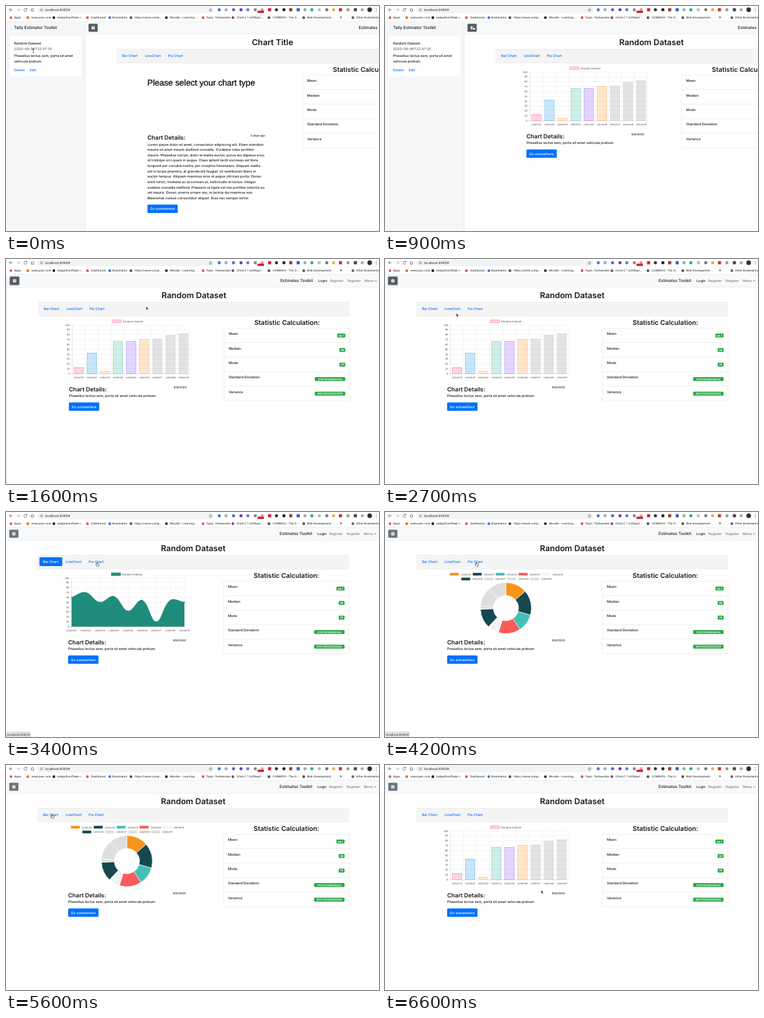
Write an HTML page that moves like this. It is 600 px wide and 362 px high and loops after 6.7 s.

```html
<!DOCTYPE html>
<html lang="en">
<head>
<meta charset="utf-8">
<title>Random Dataset</title>
<style>
html, body { margin: 0; width: 100%; height: 100%; overflow: hidden; background: #fff; }
svg { display: block; width: 100vw; height: 100vh; }
text {
  font-family: Inter, "Open Sans", sans-serif; font-size: 5.52px; font-weight: 450;
  fill: #16191c; white-space: pre; text-rendering: geometricPrecision;
}
.heading { font-weight: 600; }
.chart text { font-family: "Liberation Sans", Arial, sans-serif; font-size: 4.35px; font-weight: 400; fill: #555; }
</style>
</head>
<body>
<svg id="stage" viewBox="0 0 600 362" preserveAspectRatio="none" xmlns="http://www.w3.org/2000/svg"></svg>
<script>
const LOOP = 6700;
const SIDEBAR = 127.5;
const BLUE = '#0071fb';
const times = { load: 400, slide: 1300, line: 3050, pie: 3700, bars: 5700 };

const text = (x, y, s, attrs = '') => `<text x="${x}" y="${y}" ${attrs}>${s}</text>`;
const sized = (x, y, s, size, attrs = '', css = '') =>
  text(x, y, s, `style="font-size:${size}px;${css}" ${attrs}`);
const heading = (x, y, s, size, attrs = '') => sized(x, y, s, size, `class="heading" ${attrs}`);
const rect = (x, y, w, h, fill, attrs = '') =>
  `<rect x="${x}" y="${y}" width="${w}" height="${h}" fill="${fill}" ${attrs}/>`;
const circle = (x, y, r, fill, attrs = '') => `<circle cx="${x}" cy="${y}" r="${r}" fill="${fill}" ${attrs}/>`;
const path = (d, attrs) => `<path d="${d}" ${attrs}/>`;
const link = (x, y, s) => sized(x, y, s, 5.52, '', `fill:${BLUE}`);
const range = n => [...Array(n).keys()];
const clamp = v => Math.max(0, Math.min(1, v));
const easeOut = (p, power = 4) => 1 - (1 - clamp(p)) ** power;

// Browser window

function browserChrome() {
  const stroke = 'fill="none" stroke="#555" stroke-width=".8"';
  const dots = [
    [343, '#3f7de0'], [354, '#aaa'], [366, '#4b6fd0'], [378, '#6a3fb5'], [389, '#5b7fe0'],
    [401, '#888'], [412, '#c9a3a3'], [435, '#333'], [447, '#222'], [481, '#9aa'],
    [492, '#19b37b'], [504, '#bbb'], [516, '#777'], [527, '#e0b64a'], [550, '#999'], [573, '#aaa']
  ].map(([x, c]) => circle(x, 6, 2.5, c)).join('');
  const squares = [[424, '#d3202e'], [458, '#9c3b2e'], [470, '#2463c9'], [538, '#c8321f'], [562, '#444']]
    .map(([x, c]) => rect(x - 2.5, 3.5, 5, 5, c)).join('');
  const bookmarks = [
    [8, 13, 'Apps', '#d96a4a'], [35, 41, 'www.pwc.com', '#d9772b'],
    [77, 82, 'realpython/flask-r...', '#222'], [131, 137, 'Dashboard', '#e2574c'],
    [167, 171, 'Bookmarks', '#3f7de0'], [201, 207, 'https://www.comp...', '#555'],
    [258, 264, 'Moodle - Learning...', '#333'], [317, 322, 'Topic: Testwarden', '#e2574c'],
    [365, 371, 'Chirm | * is219spri...', '#8a4a7d'], [423, 429, 'COM9014 - The O...', '#555'],
    [479, 484, 'Web Development...', '#555'], [558, 563, 'Other Bookmarks', '#666']
  ].map(([ix, x, s, c]) => circle(ix, 18.7, 2.2, c) + sized(x, 20.3, s, 4.45, '', 'fill:#2c2f32')).join('');
  return rect(0, 0, 600, 25, '#fff') +
    path('M10.5 6H5.5M8 3.6L5.6 6L8 8.4', stroke) +
    path('M17.5 6H22.5M20 3.6L22.4 6L20 8.4', 'fill="none" stroke="#aaa" stroke-width=".8"') +
    path('M33.2 4.6A2.4 2.4 0 1 0 33.6 6.6M33.6 3.2V5H31.8', stroke) +
    path('M40 6L42.5 3.6L45 6M40.8 5.5V8.3H44.2V5.5', stroke) +
    rect(50, 1, 285, 10.5, '#f1f3f4', 'rx="5.2"') +
    circle(57, 6.2, 1.9, 'none', 'stroke="#666" stroke-width=".6"') + rect(56.7, 5.5, .6, 1.8, '#666') +
    sized(63, 8, 'localhost:8081/#', 5, '', 'fill:#333') +
    path('M329 3.7L329.7 5.5L331.6 5.6L330.1 6.8L330.6 8.6L329 7.6L327.4 8.6L327.9 6.8L326.4 5.6L328.3 5.5Z',
      'fill="none" stroke="#555" stroke-width=".5"') +
    dots + squares + rect(404.5, 7.4, 10.5, 3.8, '#d9202a', 'rx=".8"') +
    circle(585, 6, 3.7, '#3b2a2c') +
    [3.8, 6, 8.2].map(y => circle(595.5, y, .6, '#555')).join('') +
    bookmarks + sized(537, 20.4, '»', 6) + rect(0, 24.6, 600, .5, '#dcdee0');
}

// Page content, laid out with the sidebar left of x = 0

function sidebar() {
  return rect(-SIDEBAR, 25, SIDEBAR, 337, '#f4f6f8') + rect(-.7, 25, .7, 337, '#dee2e6') +
    `<g transform="translate(${-SIDEBAR})">` +
    sized(13, 37.3, 'Tally Estimator Toolkit', 6.6) +
    rect(6, 48, 115, 65.5, '#fff', 'rx="1"') +
    text(13, 61.6, 'Random Dataset') +
    sized(13, 71.2, '2020-08-06T22:47:35', 5.6, '', 'fill:#5c646c') +
    text(13, 82, 'Phasellus lectus sem, porta sit amet') + text(13, 90.6, 'vehicula pretium') +
    link(13, 105, 'Delete') + link(38.3, 105, 'Edit') + '</g>';
}

function navbar() {
  return rect(0, 25, 600, 20, '#f8f9fa') + rect(0, 45, 600, .5, '#dee2e6') +
    rect(4, 27.4, 17.2, 15.4, '#b5babf', 'rx="2.4" id="ring"') +
    rect(5.2, 28.6, 14.8, 13, '#6c757d', 'rx="1.5" id="toggle"') +
    rect(10.2, 32.8, 5, 4.6, '#fff', 'rx=".6"') +
    path('M11.2 35.1H14M12.9 34L14 35.1L12.9 36.2', 'fill="none" stroke="#555" stroke-width=".6"') +
    sized(440, 37.3, 'Estimates Toolkit', 6.5) + text(501, 37.1, 'Login') +
    [[520, 'Register'], [548, 'Register'], [575.5, 'Menu']]
      .map(([x, s]) => sized(x, 37.1, s, 5.52, '', 'fill:#7c7e80')).join('') +
    path('M592 34.4H595.6L593.8 36.3Z', 'fill="#7c7e80"');
}

function statistics() {
  const rows = [['Mean:', '58.7', 13], ['Median:', '68', 9.5], ['Mode', '66', 9.5],
    ['Standard Deviation', '27.871311418145144', 49], ['Variance', '663.1222222222223', 49]];
  return heading(398.3, 105.5, 'Statistic Calculation:', 10.6) +
    rect(349.7, 111.2, 202, 116.8, '#fff', 'stroke="#dcdcdc" stroke-width=".5" rx="1.2"') +
    rows.map(([label, value, w], i) => {
      const y = 111.2 + i * 23.36;
      return (i ? rect(349.7, y - .2, 202, .45, '#dcdcdc') : '') + text(357, y + 11.1, label) +
        rect(544.6 - w, y + 8.8, w, 6.2, '#28a745', 'rx="1.3"') +
        sized(544.6 - w / 2, y + 13.4, value, 4, 'text-anchor="middle"', 'fill:#fff;font-weight:700');
    }).join('');
}

const LOREM = `Lorem ipsum dolor sit amet, consectetur adipiscing elit. Etiam interdum
mauris sit amet mauris eleifend convallis. Curabitur vitae porttitor
mauris. Phasellus rutrum, dolor at mattis auctor, purus leo dapibus eros,
id tristique orci quam in augue. Class aptent taciti sociosqu ad litora
torquent per conubia nostra, per inceptos himenaeos. Aliquam mattis
est in turpis pharetra, at gravida elit feugiat. Ut vestibulum libero in
auctor tempus. Aliquam maximus eros ut augue ultricies porta. Donec
enim tortor, molestie ac accumsan ut, sollicitudin et lectus. Integer
sodales convallis eleifend. Praesent ut ligula vel nisi porttitor lobortis eu
vel mauris. Donec viverra ornare nisi, in lacinia dui maximus non.
Maecenas cursus consectetur aliquet. Duis nec semper tortor.`.split('\n');

function details(title, lines, date, shift) {
  const buttonY = 222.2 + shift + lines.length * 8.63;
  return heading(301.2, 62.8, title, 13.1, 'text-anchor="middle"') +
    heading(100, 212.7 + shift, 'Chart Details:', 9.3) +
    sized(289.5, 207.8 + shift, date, 4.6, 'text-anchor="end"') +
    lines.map((s, i) => text(100, 222.3 + shift + i * 8.63, s)).join('') +
    rect(100, buttonY, 48.8, 13.5, BLUE, 'rx="1.5"') +
    sized(124.4, buttonY + 8.7, 'Go somewhere', 5.52, 'text-anchor="middle"', 'fill:#fff');
}

// Charts

const TOP = 106, BOTTOM = 184.5, LEFT = 105.5;
const yOf = v => BOTTOM - v / 100 * (BOTTOM - TOP);

function axes(right, columns, centered) {
  const step = (right - LEFT) / columns;
  return range(11).map(i => rect(LEFT - 3, yOf(i * 10) - .2, right - LEFT + 3, .4, i ? '#e3e3e3' : '#bbb') +
      text(LEFT - 4, yOf(i * 10) + 1.5, i * 10, 'text-anchor="end"')).join('') +
    range(columns + 1).map(i => rect(LEFT + i * step - .2, TOP, .4, BOTTOM - TOP + 3, i ? '#e3e3e3' : '#bbb')).join('') +
    range(9).map(i => text(LEFT + (i + (centered ? .5 : 0)) * step, 192.2, 'column' + (i + 1), 'text-anchor="middle"')).join('');
}

const legend = (fill, stroke) =>
  rect(169.5, 97.9, 14.8, 4.4, fill, `stroke="${stroke}" stroke-width=".6"`) + text(186.7, 101.7, 'Random Dataset');

function barChart(grow) {
  const values = [13, 42, 5, 66, 66, 70, 71, 79, 82];
  const colors = ['#ff6384', '#36a2eb', '#ffb04f', '#4bc0a8', '#9966ff', '#ff9f40', '#999', '#999', '#999'];
  const right = 295, step = (right - LEFT) / 9;
  return axes(right, 9, true) + legend('#ffd0d9', '#ff8fa6') + values.map((v, i) => {
    const h = v * grow / 100 * (BOTTOM - TOP);
    return rect(LEFT + (i + .14) * step, BOTTOM - h, step * .72, h, colors[i],
      `fill-opacity=".27" stroke="${colors[i]}" stroke-width=".5" stroke-opacity="${i > 5 ? .35 : .9}"`);
  }).join('');
}

const SERIES = [60, 70, 50, 62, 32, 54, 10, 54, 50];

function lineChart(grow) {
  const right = 287, step = (right - LEFT) / 8, color = '#208c7b';
  const pts = SERIES.map((v, i) => [LEFT + i * step, yOf(v * grow)]);
  const handles = pts.map((p, i) => {
    const a = pts[i - 1] || p, b = pts[i + 1] || p;
    const before = Math.hypot(p[0] - a[0], p[1] - a[1]), after = Math.hypot(b[0] - p[0], b[1] - p[1]);
    const at = k => [p[0] + k * (b[0] - a[0]), Math.min(BOTTOM, p[1] + k * (b[1] - a[1]))];
    return [at(-.4 * before / (before + after)), at(.4 * after / (before + after))];
  });
  const curve = pts.slice(1).map((p, i) => `C${handles[i][1]} ${handles[i + 1][0]} ${p}`).join('');
  return axes(right, 8, false) + legend(color, color) +
    path(`M${pts[0]}${curve}V${BOTTOM}H${LEFT}Z`, `fill="${color}"`) +
    path(`M${pts[0]}${curve}`, `fill="none" stroke="${color}" stroke-width=".8"`) +
    pts.map(p => circle(p[0], p[1], .9, '#3d7a70')).join('');
}

function pieChart(grow, hovered) {
  const colors = ['#f7941d', '#17484f', '#44c0b5', '#fb5b5b', '#f2f2f2', '#17484f', '#dedede', '#dedede', '#dedede'];
  const total = SERIES.reduce((a, b) => a + b);
  const point = (r, a) => `${194.5 + r * Math.sin(a)} ${154.6 - r * Math.cos(a)}`;
  const labels = colors.map((c, i) => {
    const x = i < 5 ? 104.3 + i * 36.9 : 122.8 + (i - 5) * 36.9, y = i < 5 ? 97.9 : 105.6;
    return rect(x, y, 14.3, 4.3, c) + text(x + 17.8, y + 3.8, 'column' + (i + 1));
  }).join('');
  let angle = 0;
  const slices = SERIES.map((v, i) => {
    const start = angle, end = angle += v / total * 2 * Math.PI * grow, large = +(end - start > Math.PI);
    return path(`M${point(41, start)}A41 41 0 ${large} 1 ${point(41, end)}L${point(20.3, end)}A20.3 20.3 0 ${large} 0 ${point(20.3, start)}Z`,
      `fill="${colors[i]}" stroke="#fff" stroke-width=".7"`);
  }).join('');
  const tip = hovered ? rect(184.3, 122.6, 33.7, 8.7, '#222', 'rx="1.8"') + path('M184.5 125.2L182.5 127L184.5 128.8Z', 'fill="#222"') +
    rect(187, 124.8, 4.2, 4.2, '#dedede', 'stroke="#fff" stroke-width=".4"') +
    sized(192.5, 128.5, 'column9: 66', 4.2, '', 'fill:#fff') : '';
  return labels + slices + tip;
}

function chartAt(t) {
  const grown = (start, length) => easeOut((t - start) / length);
  if (t < times.load) return sized(99.8, 128.2, 'Please select your chart type', 13.5, 'stroke="#16191c" stroke-width=".4"', 'fill:#16191c');
  if (t < times.line) return barChart(grown(times.load, 450));
  if (t < times.pie) return lineChart(grown(times.line, 330));
  if (t < times.bars) return pieChart(grown(times.pie, 450), t >= 4700 && t < 5250);
  return barChart(grown(times.bars, 500));
}

// Pointer: time, x, y of the hot spot

const route = [
  [0, 44, 72], [200, 43, 61], [450, 43, 61], [850, 142, 32], [1350, 142, 32], [1600, 225.5, 76.5],
  [2000, 225.5, 76.5], [2650, 115, 87.5], [2750, 115, 87.5], [2950, 110, 80], [3100, 110, 80],
  [3350, 146.5, 80.5], [4300, 147, 80.5], [4800, 184, 135], [5100, 184, 135],
  [5500, 74, 79], [5900, 74, 79], [6500, 251.3, 201.5], [LOOP, 251.3, 201.5]
];

function pointerAt(t) {
  const i = Math.max(1, route.findIndex(stop => stop[0] > t));
  const [t0, x0, y0] = route[i - 1], [t1, x1, y1] = route[i];
  const p = (t - t0) / (t1 - t0), k = p * p * (3 - 2 * p);
  return [x0 + (x1 - x0) * k, y0 + (y1 - y0) * k];
}

const pointers = {
  beam: path('M-1.3 -3.2Q0 -3.2 0 -2.3Q0 -3.2 1.3 -3.2M0 -2.3V2.3M-1.3 3.2Q0 3.2 0 2.3Q0 3.2 1.3 3.2', 'fill="none" stroke="#222" stroke-width=".7"'),
  arrow: path('M0 0V5L1.1 4L2 6L2.9 5.6L2 3.7H3.6Z', 'fill="#000" stroke="#fff" stroke-width=".4"'),
  hand: path('M-.6 .6Q0 -.4 .6 .6V2.6L3 3.3Q3.6 3.6 3.3 4.5L2.6 6.6H-.5L-2.2 4.2Q-2.2 3.2 -.6 4Z', 'fill="#fff" stroke="#111" stroke-width=".6"')
};

function pointerKind(t) {
  if (t < 150) return 'beam';
  const over = [[150, 550], [820, 1420], [2850, 4400], [5450, 5980]].some(([a, b]) => t >= a && t < b);
  return over ? 'hand' : 'arrow';
}

// Assembly

const stage = document.getElementById('stage');
stage.innerHTML = rect(0, 0, 600, 362, '#fff') +
  '<g id="page">' + sidebar() + navbar() +
  rect(50.3, 69, 501.7, 23, '#f4f4f4') + rect(50.3, 69, 501.7, .4, '#dedede') + rect(50.3, 91.7, 501.7, .4, '#dedede') +
  rect(53.8, 72.8, 36.7, 14.2, BLUE, 'rx="1.5" id="active"') +
  `<g id="barLink">${link(59.5, 82, 'Bar Chart')}</g>` + link(96, 82, 'LineChart') + link(133, 82, 'Pie Chart') +
  statistics() + '<g id="details"></g><g id="chart" class="chart"></g></g>' + browserChrome() +
  '<g id="status">' + rect(-2, 353.8, 41.5, 10, '#dfe1e5', 'rx="1.5" stroke="#c4c6c9" stroke-width=".4"') +
  sized(1.5, 360, 'localhost:8081/#', 4.6, '', 'fill:#444') + '</g><g id="pointer"></g>';

const part = id => document.getElementById(id);
const cache = {};
function setMarkup(id, markup) {
  if (cache[id] !== markup) part(id).innerHTML = cache[id] = markup;
}
const show = (id, on) => part(id).setAttribute('visibility', on ? 'visible' : 'hidden');

function draw(t) {
  const offset = SIDEBAR * (1 - easeOut((t - times.slide) / 380, 3));
  part('page').setAttribute('transform', `translate(${offset})`);
  setMarkup('details', t < times.load
    ? details('Chart Title', LOREM, '3 days ago', 2.3)
    : details('Random Dataset', ['Phasellus lectus sem, porta sit amet vehicula pretium'], '8/6/2020', 0));
  setMarkup('chart', chartAt(t));

  show('ring', t >= times.slide && t < times.line);
  part('toggle').setAttribute('fill', t < times.line ? '#545b62' : '#6c757d');
  const active = t >= times.line && t < times.pie;
  show('active', active);
  part('barLink').firstChild.style.fill = active ? '#fff' : BLUE;
  show('status', t >= 2950 && t < 4500);

  const [x, y] = pointerAt(t);
  part('pointer').setAttribute('transform', `translate(${x} ${y})`);
  setMarkup('pointer', pointers[pointerKind(t)]);
}

const began = performance.now();
function tick() {
  draw((performance.now() - began) % LOOP);
  requestAnimationFrame(tick);
}
tick();
</script>
</body>
</html>
```
